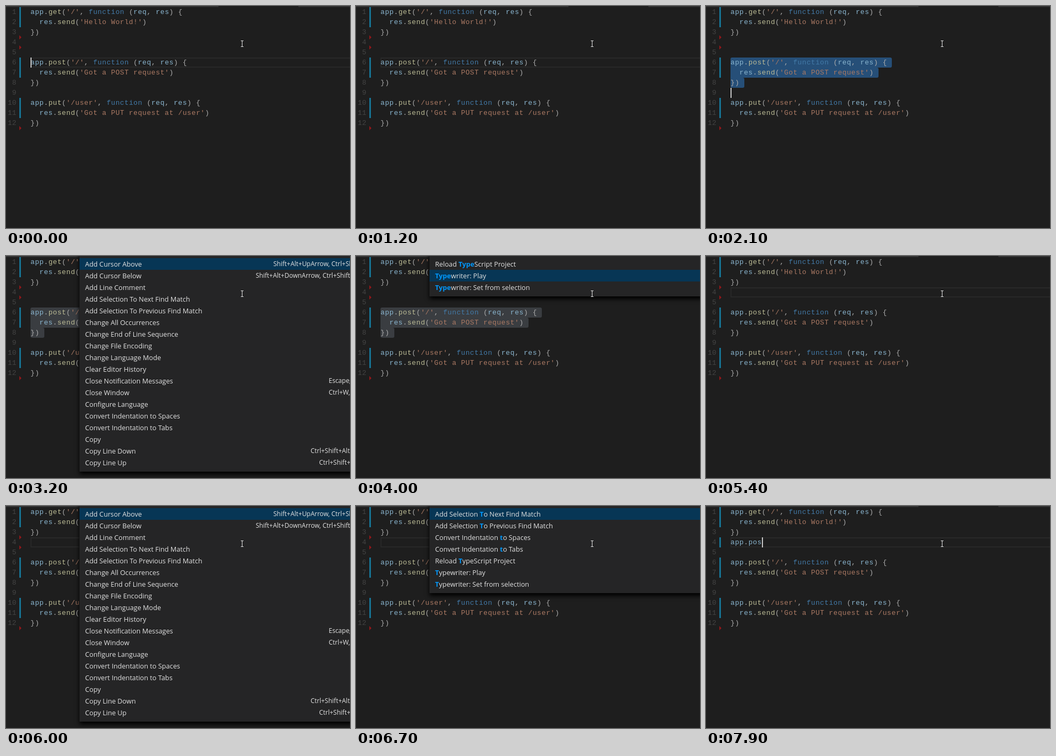
Recreate the animation shown at these times as an HTML page. Size 646x418 px, loop 8000 ms.

```html
<!DOCTYPE html>
<html lang="en">
<head>
<meta charset="utf-8">
<title>Editor</title>
<style>
  html, body { margin: 0; width: 100%; height: 100%; overflow: hidden; background: #1e1e1e; }
  #stage { position: relative; width: 646px; height: 418px; overflow: hidden; background: #1e1e1e; }
  #stage div, #stage svg { position: absolute; box-sizing: border-box; }
  .tab { top: 0; height: 2px; background: #343434; }
  .code, .num { font: 13px/19px "Liberation Mono", monospace; letter-spacing: .6px; white-space: pre; height: 19px; }
  .code { left: 46px; color: #acacac; }
  .num { left: 0; width: 20px; text-align: right; color: #444; }
  .var { color: #8ab6d0; }
  .fn { color: #bcbc96; }
  .kw { color: #437aa8; }
  .str { color: #ac7a64; }
  .bar { left: 25px; width: 3px; background: #177495; }
  .del { left: 25px; border: 4px solid transparent; border-left-color: #941619; border-right: 0; }
  #line { left: 46px; width: 610px; height: 19px; border: 2px solid #282828; }
  .sel { height: 19px; border-radius: 0 3px 3px 0; background: #264f78; }
  .sel.dim { background: #3a3d41; }
  .sel.first { border-top-left-radius: 3px; }
  .sel.last { border-bottom-left-radius: 3px; }
  #caret { width: 2px; height: 19px; background: #c8c8c8; }
  #menu { left: 138px; top: -40px; width: 600px; background: #252526;
          box-shadow: 0 5px 8px #000; font: 12.7px/22px "Open Sans", "Noto Sans", sans-serif; color: #e2e2e2; }
  #menu .row { left: 0; width: 600px; height: 22px; padding-left: 10.5px; white-space: pre; }
  #menu .on { background: #073655; }
  #menu .key { top: 0; font-size: 12px; }
  #menu b { color: #0097fb; }
</style>
</head>
<body>
<div id="stage">
  <div class="tab" style="left:0;width:399px"></div>
  <div class="tab" style="left:549px;width:97px"></div>
  <div id="line"></div>
  <div id="sels" style="left:0;top:0"></div>
  <div id="text"></div>
  <div id="gutter"></div>
  <div id="caret"></div>
  <div id="menu"></div>
  <svg style="left:438px;top:63px" width="12" height="16" fill="none">
    <path d="M3 2.5h5M5.5 3v10M3 13.5h5" stroke="#e4e4e4"/>
  </svg>
</div>
<script>
const LOOP = 8000, LINE = 19, CHAR = 8.4, LEFT = 46;
const $ = id => document.getElementById(id);
const lineTop = n => 2 + (n - 1) * LINE;

const source = [
  "app.get('/', function (req, res) {", "  res.send('Hello World!')", "})", "", "",
  "app.post('/', function (req, res) {", "  res.send('Got a POST request')", "})", "",
  "app.put('/user', function (req, res) {", "  res.send('Got a PUT request at /user')", "})"
];
const typed = "app.pos";

// label, shortcut, shortcut's left edge on the stage
const commands = [
  ["Add Cursor Above", "Shift+Alt+UpArrow, Ctrl+Shift+UpArrow", 502],
  ["Add Cursor Below", "Shift+Alt+DownArrow, Ctrl+Shift+DownArrow", 469],
  ["Add Line Comment"],
  ["Add Selection To Next Find Match"],
  ["Add Selection To Previous Find Match"],
  ["Change All Occurrences"],
  ["Change End of Line Sequence"],
  ["Change File Encoding"],
  ["Change Language Mode"],
  ["Clear Editor History"],
  ["Close Notification Messages", "Escape, Shift+Escape", 606],
  ["Close Window", "Ctrl+W, Ctrl+Shift+W", 606],
  ["Configure Language"],
  ["Convert Indentation to Spaces"],
  ["Convert Indentation to Tabs"],
  ["Copy"],
  ["Copy Line Down", "Ctrl+Shift+Alt+DownArrow", 572],
  ["Copy Line Up", "Ctrl+Shift+Alt+UpArrow", 588],
  ["Reload TypeScript Project"],
  ["Typewriter: Play"],
  ["Typewriter: Set from selection"]
];

// time, query (null = closed), chosen row
const menuSteps = [
  [0, null], [3000, "", 0], [3500, "t", 0], [3700, "ty", 0], [3800, "typ", 0], [3900, "type", 0],
  [3980, "type", 1], [4200, "type", 2], [4400, null],
  [5700, "", 0], [6100, "t", 0], [7100, "type", 0], [7200, "type", 1], [7300, null]
];

// time, caret line, start of the blink cycle
const caretSteps = [
  [0, 6, -400], [1900, 7, 1900], [2000, 8, 2000], [2100, 9, 2100], [4400, 9, 4400], [4800, 4, 4800]
];
const TYPE_START = 7350, TYPE_STEP = 80, MARK_TIME = 7600;

const at = (steps, t) => steps.filter(s => s[0] <= t).pop();

function colour(code) {
  return code.replace(/'[^']*'|\w+/g, w => {
    const kind = w[0] === "'" ? "str" : w === "function" ? "kw"
      : /^(get|post|put|send)$/.test(w) ? "fn" : "var";
    return `<span class="${kind}">${w}</span>`;
  });
}

function drawText(line4) {
  $("text").innerHTML = source.map((s, i) =>
    `<div class="num" style="top:${lineTop(i + 1)}px">${i + 1}</div>` +
    `<div class="code" style="top:${lineTop(i + 1)}px">${colour(i === 3 ? line4 : s)}</div>`).join("");
}

function drawGutter(marked) {
  const bars = [[1, 2], [6, 2], [10, 2]], dels = [12];
  if (marked) bars.push([4, 1]); else dels.push(3, 4);
  $("gutter").innerHTML =
    bars.map(([n, h]) => `<div class="bar" style="top:${lineTop(n)}px;height:${h * LINE}px"></div>`).join("") +
    dels.map(n => `<div class="del" style="top:${lineTop(n + 1) - 4}px"></div>`).join("");
}

function drawSelection(end, dim) {
  let html = "";
  for (let n = 6; n < end; n++) {
    const kind = (dim ? " dim" : "") + (n === 6 ? " first" : "") + (n === end - 1 ? " last" : "");
    const width = (source[n - 1].length + 1) * CHAR + 1;
    html += `<div class="sel${kind}" style="left:${LEFT}px;top:${lineTop(n)}px;width:${width}px"></div>`;
  }
  $("sels").innerHTML = html;
}

function drawMenu(query, row) {
  const menu = $("menu");
  menu.style.display = query === null ? "none" : "block";
  if (query === null) return;
  const match = new RegExp("\\b" + query, "i");
  const rows = query ? commands.filter(c => match.test(c[0])) : commands.slice(0, 18);
  menu.style.height = 40 + 4 + rows.length * 22 + 6 + "px";
  menu.innerHTML = rows.map(([label, key, x], i) =>
    `<div class="row${i === row ? " on" : ""}" style="top:${44 + i * 22}px">` +
    (query ? label.replace(match, "<b>$&</b>") : label) +
    (key ? `<div class="key" style="left:${x - 138}px">${key}</div>` : "") + "</div>").join("");
}

// Redraw a part only when its arguments change.
const last = new Map();
function update(draw, ...args) {
  const key = JSON.stringify(args);
  if (last.get(draw) === key) return;
  last.set(draw, key);
  draw(...args);
}

function render(t) {
  const [, query, row] = at(menuSteps, t);
  const [, line, since] = at(caretSteps, t);
  const open = query !== null;
  const count = t < TYPE_START ? 0 : Math.floor((t - TYPE_START) / TYPE_STEP) + 1;
  const shown = typed.slice(0, count);
  const selecting = t >= 1900 && t < 4800;

  update(drawText, shown);
  update(drawGutter, t >= MARK_TIME);
  update(drawSelection, selecting ? line : 6, open);
  update(drawMenu, query, row);

  $("line").style.display = selecting ? "none" : "block";
  $("line").style.top = lineTop(line) + "px";
  const lit = t >= 7300 || Math.floor((t - since) / 500) % 2 === 0;
  const caret = $("caret").style;
  caret.display = lit && !open ? "block" : "none";
  caret.left = Math.round(LEFT + shown.length * CHAR) + "px";
  caret.top = lineTop(line) + "px";
}

const start = performance.now();
function tick() {
  render((performance.now() - start) % LOOP);
  requestAnimationFrame(tick);
}
tick();
</script>
</body>
</html>
```
